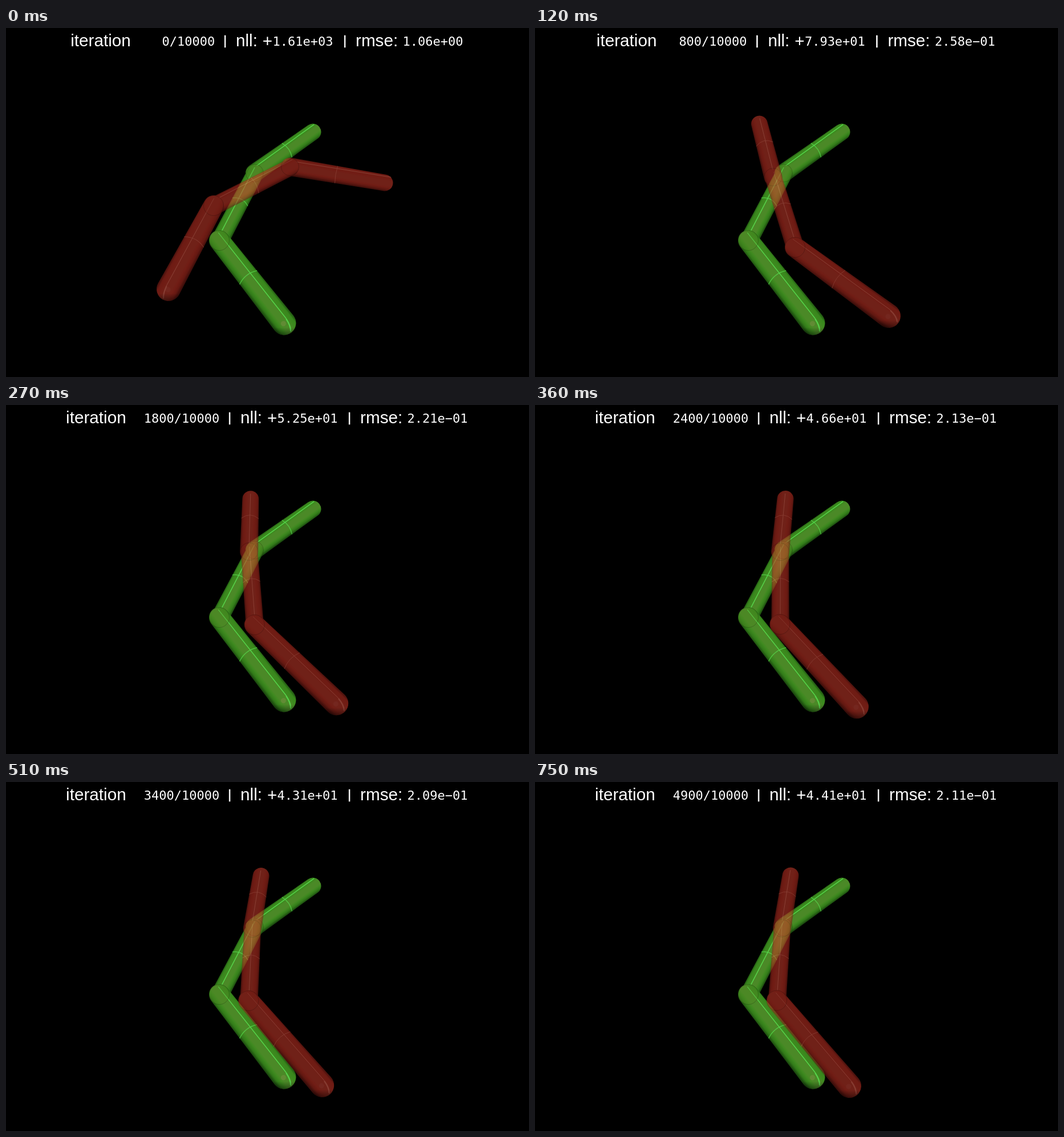
An HTML page that plays this animation: 917 by 611 pixels, repeating every 1780 ms.

```html
<!DOCTYPE html>
<html lang="en">
<head>
<meta charset="utf-8">
<title>Pose fitting</title>
<style>
  html, body { margin: 0; width: 100%; height: 100%; overflow: hidden; background: #000; }
  svg { display: block; width: 917px; height: 611px; }
  text { fill: #fff; white-space: pre; }
  .sans { font: 29.7px "Liberation Sans", Arial, sans-serif; }
  .bar { font: 22px "Liberation Sans", Arial, sans-serif; text-anchor: middle; stroke: #fff; stroke-width: .7; }
  .mono { font: 22px "DejaVu Sans Mono", monospace; }
  .end { text-anchor: end; }
</style>
</head>
<body>
<svg viewBox="0 0 917 611">
  <defs>
    <linearGradient id="capShade" x2="0" y2="1">
      <stop offset=".68" stop-opacity="0"/>
      <stop offset="1" stop-opacity=".45"/>
    </linearGradient>
  </defs>
  <g id="scene"></g>
  <g id="label"></g>
</svg>
<script>
const LOOP = 1780, STEP = 30, LAST_STEP = 25;
const RADII = [21, 18, 16, 14.5];

const GREEN = { mid: [75, 137, 39], side: [58, 139, 29], dark: [22, 62, 12], line: "rgb(88,222,80)", width: 1.4 };
const RED = { mid: [205, 60, 44], side: [206, 51, 37], dark: [95, 22, 16], line: "rgb(255,125,105)", width: 0.9 };

// Chains run from the thick tip to the thin tip.
const GOAL = [[487.5, 516.5], [374, 372], [436, 254], [538, 182]];

// iteration, nll, rmse, then the four points of the moving chain
const KEYS = [
  [0, 1610, 1.06, 285, 457, 364, 311, 498, 243, 664, 271],
  [800, 79.3, 0.258, 620, 504, 456, 384, 417.5, 261, 393.5, 168],
  [1400, 58.7, 0.230, 592, 517, 441.5, 385, 423, 257, 419.5, 165],
  [2400, 46.6, 0.213, 564, 528, 429.5, 384, 430, 257, 439, 164.5],
  [3000, 43.6, 0.209, 556, 530.5, 426, 383, 431.5, 257, 445.5, 164.5],
  [4000, 43.0, 0.209, 553, 531, 425, 383, 432, 256, 448, 164.5],
  [4900, 44.1, 0.211, 551, 532, 424, 382.5, 433, 256, 448, 164]
];

const polar = (x0, y0, x1, y1) => [Math.atan2(y1 - y0, x1 - x0), Math.hypot(x1 - x0, y1 - y0)];
const times = KEYS.map(k => k[0]);

// Joint space: logs of the scores, middle of the centre limb, angle and length of each limb
const states = KEYS.map(([, nll, rmse, ax, ay, bx, by, cx, cy, dx, dy]) => [
  Math.log(nll), Math.log(rmse), (bx + cx) / 2, (by + cy) / 2,
  ...polar(bx, by, ax, ay), ...polar(bx, by, cx, cy), ...polar(cx, cy, dx, dy)
]);

const slope = (i, j, c) => (states[j][c] - states[i][c]) / (times[j] - times[i]);

function tangent(i, c) {
  if (i === 0) return 2 * slope(0, 1, c);
  if (i === 1) return slope(1, 2, c);
  const next = Math.min(i + 1, times.length - 1);
  return slope(i - 1, next, c);
}

function stateAt(iteration) {
  let i = 0;
  while (i < times.length - 2 && iteration >= times[i + 1]) i++;
  const span = times[i + 1] - times[i], t = (iteration - times[i]) / span;
  const t2 = t * t, t3 = t2 * t;
  return states[i].map((from, c) =>
    (2 * t3 - 3 * t2 + 1) * from + (3 * t2 - 2 * t3) * states[i + 1][c] +
    span * ((t3 - 2 * t2 + t) * tangent(i, c) + (t3 - t2) * tangent(i + 1, c)));
}

const along = ([x, y], angle, length) => [x + length * Math.cos(angle), y + length * Math.sin(angle)];

function chainFrom([, , mx, my, a1, l1, a2, l2, a3, l3]) {
  const b = along([mx, my], a2, -l2 / 2), c = along([mx, my], a2, l2 / 2);
  return [along(b, a1, l1), b, c, along(c, a3, l3)];
}

const mix = (from, to, k) => `rgb(${from.map((v, i) => Math.round(v + (to[i] - v) * k))})`;

// Tapered capsule from p to q, drawn along the local x axis
function limb(id, p, q, r1, r2, skin, isTip) {
  const [angle, d] = polar(...p, ...q);
  const sin = Math.sin(angle), cos = Math.cos(angle);
  const lean = (r1 - r2) / d, rise = Math.sqrt(1 - lean * lean), r = (r1 + r2) / 2;
  const x1 = r1 * lean, y1 = r1 * rise, x2 = d + r2 * lean, y2 = r2 * rise;
  const edge = side => mix(skin.dark, skin.side, 0.3 - 0.25 * side * cos);
  const flank = side => mix(skin.dark, skin.side, 0.87 - 0.13 * side * cos);
  const inner = mix(skin.side, skin.mid, 0.3), middle = mix(skin.side, skin.mid, 1);
  const stops = [
    [0, edge(-1)], [0.11 - 0.04 * cos, flank(-1)], [0.27, inner], [0.36, middle],
    [0.64, middle], [0.73, inner], [0.89 - 0.04 * cos, flank(1)], [1, edge(1)]
  ].map(([o, c]) => `<stop offset="${o}" stop-color="${c}"/>`).join("");
  const lift = -0.8 * cos, ring = d / 2 - 12 * sin, apex = ring - 12 * sin;
  const tipCurve = `Q${d + r2 * 0.55} ${lift * r2 * 0.6} ${d + r2 * 0.9} 0`;
  const seamEnd = isTip ? `L${d - 5} ${lift * r2 * 0.75}${tipCurve}` : `L${d + r2 * 0.65} ${lift * r2}`;
  return `<g transform="translate(${p}) rotate(${angle * 180 / Math.PI})">
    <linearGradient id="${id}" gradientUnits="userSpaceOnUse" x1="0" x2="0" y1="${-r}" y2="${r}">${stops}</linearGradient>
    <path fill="url(#${id})" d="M${x1} ${y1}A${r1} ${r1} 0 ${+(lean > 0)} 1 ${x1} ${-y1}L${x2} ${-y2}A${r2} ${r2} 0 ${+(lean < 0)} 1 ${x2} ${y2}Z"/>
    <g fill="none" stroke="${skin.line}" stroke-width="${skin.width}" opacity=".9">
      <path d="M${-r1 * 0.65} ${lift * r1 * 0.8}${seamEnd}"/>
      <path d="M${ring} ${-r}Q${apex} 0 ${ring} ${r}" opacity=".75"/>
      ${isTip ? `<path d="M${d - 3} ${lift * r2 * 0.7}${tipCurve}" stroke-width="2.4" opacity=".7"/>` : ""}
    </g>
  </g>`;
}

const joint = ([x, y], r, skin) =>
  `<circle cx="${x}" cy="${y}" r="${r - 0.5}" fill="${mix(skin.side, [255, 90, 60], 0.12)}" fill-opacity=".3" stroke="#000" stroke-opacity=".2"/>`;

function chain(name, [a, b, c, d], skin) {
  const sag = ([x, y]) => [x + 0.5, y + 1];
  return limb(name + "Top", c, d, RADII[2], RADII[3], skin) +
    limb(name + "Mid", sag(b), sag(c), 15.7, 14.7, skin) + joint(c, RADII[2], skin) +
    limb(name + "Low", b, a, RADII[1], RADII[0], skin, true) + joint(b, RADII[1], skin) +
    `<circle cx="${a[0]}" cy="${a[1]}" r="${RADII[0]}" fill="url(#capShade)"/>
     <circle cx="${a[0] - 1}" cy="${a[1] + 1}" r="4.5" fill="#f99" opacity=".13"/>`;
}

function scientific(value) {
  const [mantissa, power] = value.toExponential(2).split("e");
  return mantissa + "e" + (power < 0 ? "−" : "+") + String(Math.abs(power)).padStart(2, "0");
}

function label(iteration, nll, rmse) {
  const shift = 2.7 * (String(iteration).length - 1);
  const put = (x, y, cls, str) => `<text x="${x}" y="${y}" class="${cls}">${str}</text>`;
  return put(113.2 - shift, 32, "sans", "iteration") +
    put(366.2 + shift, 31, "mono end", iteration + "/10000") +
    put(384 + shift, 29, "bar", "|") +
    put(403 + shift, 32, "sans", "nll:") + put(449.8 + shift, 33, "sans", "+") +
    put(467.5 + shift, 31, "mono", scientific(nll)) +
    put(594 + shift, 29, "bar", "|") +
    put(613 + shift, 32, "sans", "rmse:") +
    put(695.5 + shift, 31, "mono", scientific(rmse));
}

const sceneNode = document.getElementById("scene"), labelNode = document.getElementById("label");
let shown = -1;

function draw(ms) {
  const step = Math.min(LAST_STEP, Math.floor((ms % LOOP) / STEP));
  if (step === shown) return;
  shown = step;
  const iteration = Math.min(step * 200, 4900), state = stateAt(iteration);
  sceneNode.innerHTML = chain("goal", GOAL, GREEN) +
    `<g opacity=".55">${chain("fit", chainFrom(state), RED)}</g>`;
  labelNode.innerHTML = label(iteration, Math.exp(state[0]), Math.exp(state[1]));
}

const start = performance.now();
function tick() {
  draw(performance.now() - start);
  requestAnimationFrame(tick);
}
tick();
</script>
</body>
</html>
```
